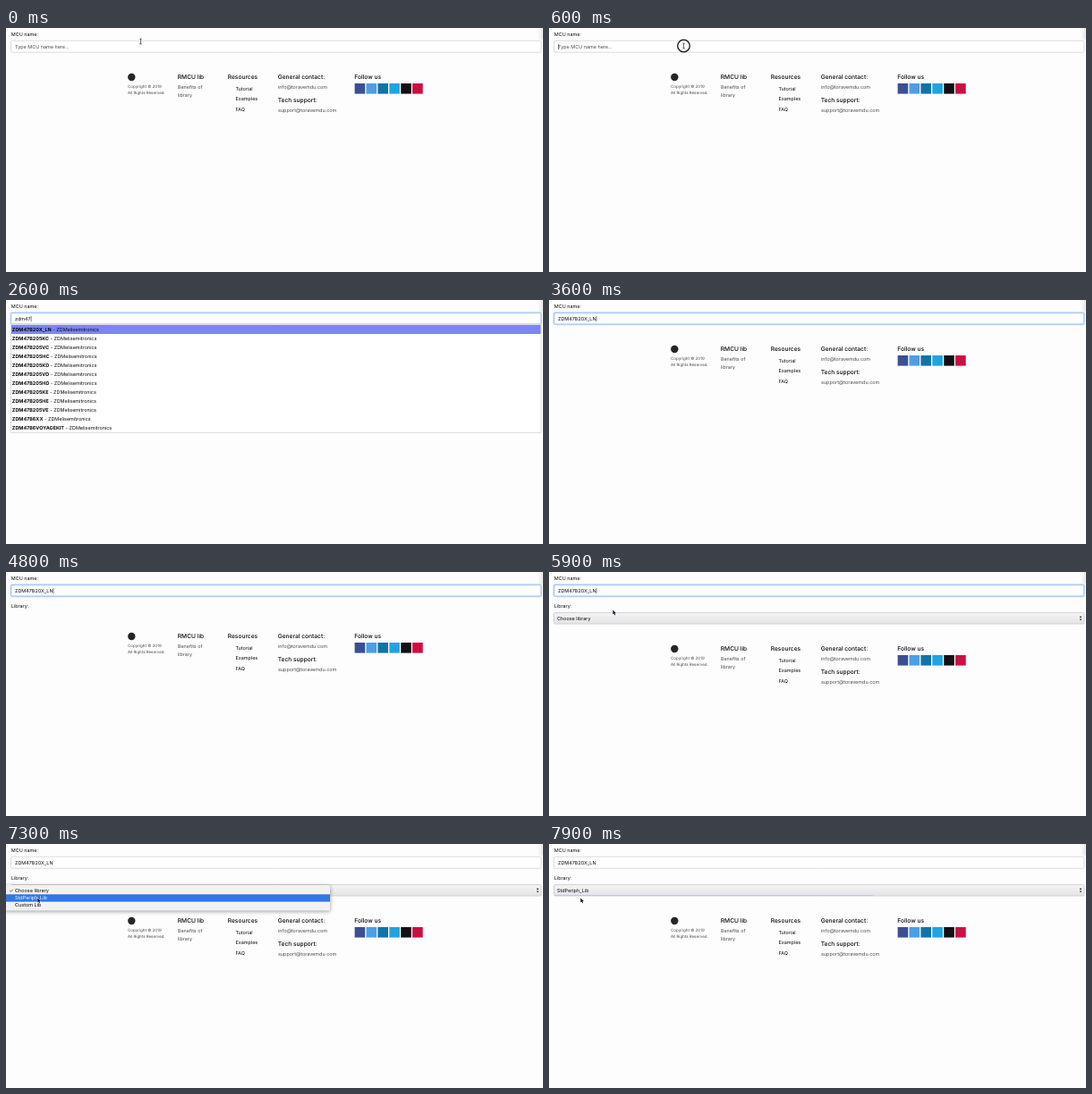
Recreate the animation shown at these times as an HTML page with a canvas. Size 600x273 px, loop 8000 ms.

```html
<!DOCTYPE html>
<html lang="en">
<head>
<meta charset="utf-8">
<title>Part picker</title>
<style>
html, body { margin: 0; width: 100%; height: 100%; overflow: hidden; background: #fefdfe; }
canvas { display: block; width: 600px; height: 273px; }
</style>
</head>
<body>
<canvas id="stage"></canvas>
<script>
const W = 600, H = 273, LOOP = 8000;
const canvas = document.getElementById('stage');
const ctx = canvas.getContext('2d');
const dpr = window.devicePixelRatio || 1;
canvas.width = W * dpr;
canvas.height = H * dpr;

const INK = '#08090b', GREY = '#46494d', BORDER = '#dadce0';
const MAKER = 'ZDMelisemitronics';
const PREFIX = 'zdm47';
const PART = 'ZDM47B20X_LN';
const PARTS = [PART,
  ...['KC', 'VC', 'HC', 'KD', 'VD', 'HD', 'KE', 'HE', 'VE'].map(s => 'ZDM47B205' + s),
  'ZDM47B6XX', 'ZDM47B6VOYAGEKIT'];
const OPTIONS = ['Choose library', 'StdPeriph_Lib', 'Custom Lib'];

// Times in ms
const FOCUS = 600, LIST_OPEN = 1500, ROW_ACTIVE = 2600, PICK = 3300;
const LABEL_IN = 4200, SELECT_IN = 5400, POPUP_OPEN = 6400, HOVER_NEXT = 7000;
const POPUP_CLOSE = 7500, POPUP_FADE = 250;
const KEYS = [1300, 1600, 1800, 2100, 2300];

const clamp = v => Math.max(0, Math.min(1, v));
const ramp = (t, from, to) => clamp((t - from) / (to - from));
const ease = p => p * p * (3 - 2 * p);
const mix = (a, b, p) => a + (b - a) * p;

function text(str, x, y, size = 5.45, color = INK, weight = 400) {
  ctx.font = `${weight} ${size}px Inter, "Open Sans", sans-serif`;
  ctx.fillStyle = color;
  ctx.fillText(str, x, y);
  return ctx.measureText(str).width;
}

function box(x, y, w, h, r, fill, stroke, line = 1) {
  ctx.beginPath();
  ctx.roundRect(x, y, w, h, r);
  if (fill) { ctx.fillStyle = fill; ctx.fill(); }
  if (stroke) { ctx.strokeStyle = stroke; ctx.lineWidth = line; ctx.stroke(); }
}

function footer(dy) {
  ctx.save();
  ctx.translate(0, dy);
  const head = (s, x, y) => text(s, x, y, 6.65, INK, 550);
  ctx.fillStyle = '#24262a';
  ctx.beginPath();
  ctx.arc(140.3, 55, 4.2, 0, 7);
  ctx.fill();
  text('Copyright © 2019', 136, 65.5, 4.5, GREY);
  text('All Rights Reserved.', 136, 72.3, 4.45, GREY);
  head('RMCU lib', 191.8, 55.2);
  text('Benefits of', 192, 66.5, 5.35, GREY);
  text('library', 192, 75, 5.35, GREY);
  head('Resources', 247.7, 55.2);
  ['Tutorial', 'Examples', 'FAQ'].forEach((s, i) => text(s, 256.5, 68.2 + i * 11.5));
  head('General contact:', 303.7, 55.2);
  text('info@toravemdu.com', 304, 66.6, 5.45, GREY);
  head('Tech support:', 303.7, 80.8);
  text('support@toravemdu.com', 304, 92.2, 5.45, GREY);
  head('Follow us', 389.3, 55.2);
  ['#3b4f92', '#4c9fe2', '#1273ab', '#22a3df', '#111111', '#cc0f40'].forEach((c, i) => {
    ctx.fillStyle = c;
    ctx.fillRect(389.6 + i * 12.9, 62, 11.6, 11.6);
  });
  ctx.restore();
}

function input(t) {
  const focus = ramp(t, FOCUS, FOCUS + 150) * (1 - ramp(t, POPUP_OPEN, 7200));
  box(5.5, 14.2, 592.5, 13, 1.6, '#fff', BORDER);
  if (focus > 0) {
    ctx.save();
    ctx.globalAlpha = focus;
    box(5.5, 14.2, 592.5, 13, 2, null, '#d9e7fb', 2.4);
    box(5.5, 14.2, 592.5, 13, 1.6, null, '#a3c6f6');
    ctx.restore();
  }
  const typed = PREFIX.slice(0, KEYS.filter(k => t >= k).length);
  const value = t >= PICK ? PART : typed;
  const width = value ? text(value, 10, 21.2) : 0;
  if (!value) text('Type MCU name here...', 10, 21.2, 5.45, GREY);

  const typing = t >= KEYS[0] && t < 3900;
  const blinkOn = Math.floor((t + 400) / 500) % 2 === 0;
  if (t >= FOCUS && t < POPUP_OPEN && (typing || blinkOn)) {
    ctx.fillStyle = '#333';
    ctx.fillRect(10.2 + width, 18, 0.6, 6.2);
  }
}

function suggestions(t) {
  if (t < LIST_OPEN || t >= PICK) return;
  box(5.5, 27.5, 592.5, 121, 0, '#fff', '#dcdce0');
  if (t >= ROW_ACTIVE) {
    ctx.fillStyle = '#7c85f6';
    ctx.fillRect(6, 28, 591.5, 10);
  }
  PARTS.forEach((name, i) => {
    const y = 33.2 + i * 10;
    const width = text(name, 6.8, y, 5.45, INK, 700);
    text(' - ' + MAKER, 6.8 + width, y);
  });
}

function triangle(x, y, h) {
  ctx.beginPath();
  ctx.moveTo(x - 1.2, y);
  ctx.lineTo(x + 1.2, y);
  ctx.lineTo(x, y + h);
  ctx.fill();
}

function select(t) {
  if (t < SELECT_IN) return;
  const shade = ctx.createLinearGradient(0, 45, 0, 58);
  shade.addColorStop(0, '#f5f5f6');
  shade.addColorStop(1, '#e4e4e7');
  box(5.5, 45.5, 592.5, 12.5, 1.5, shade, '#d2d2d6');
  text(OPTIONS[t >= POPUP_CLOSE ? 1 : 0], 9, 51.9);
  ctx.fillStyle = '#222';
  triangle(594, 51, -2);
  triangle(594, 52.4, 2);
}

function popup(t) {
  if (t < POPUP_OPEN) return;
  const alpha = 1 - ramp(t, POPUP_CLOSE, POPUP_CLOSE + POPUP_FADE);
  if (alpha === 0) {
    ctx.fillStyle = 'rgba(140,140,235,.3)';
    ctx.fillRect(6, 57, 356, 1);
    return;
  }
  ctx.save();
  ctx.globalAlpha = alpha;
  ctx.shadowColor = 'rgba(0,0,0,.4)';
  ctx.shadowBlur = 4 * dpr;
  ctx.shadowOffsetY = dpr;
  box(-2, 46, 364, 28.5, 2, '#f2f2f3');
  ctx.shadowColor = 'transparent';
  const active = t >= HOVER_NEXT ? 1 : 0;
  ctx.fillStyle = '#2f78e6';
  ctx.fillRect(0, 48.3 + active * 8, 362, 8.3);
  OPTIONS.forEach((s, i) => text(s, 10, 52.5 + i * 8, 5.5, i === active ? '#fff' : INK));
  text('✓', 3.5, 52.5, 5.5, active ? INK : '#fff');
  ctx.restore();
}

function ibeam(x, y) {
  ctx.strokeStyle = '#333';
  ctx.lineWidth = 0.7;
  ctx.beginPath();
  ctx.moveTo(x - 1.3, y - 2.8);
  ctx.lineTo(x + 1.3, y - 2.8);
  ctx.moveTo(x, y - 2.8);
  ctx.lineTo(x, y + 2.8);
  ctx.moveTo(x - 1.3, y + 2.8);
  ctx.lineTo(x + 1.3, y + 2.8);
  ctx.stroke();
}

function arrow(x, y) {
  ctx.beginPath();
  [[0, 0], [0, 5], [1.2, 4], [2, 5.8], [2.8, 5.4], [2, 3.7], [3.6, 3.6]]
    .forEach(([dx, dy]) => ctx.lineTo(x + dx, y + dy));
  ctx.closePath();
  ctx.lineWidth = 0.8;
  ctx.strokeStyle = '#fff';
  ctx.stroke();
  ctx.fillStyle = '#10131f';
  ctx.fill();
}

function ring(x, y) {
  ctx.strokeStyle = '#15171c';
  ctx.lineWidth = 1.3;
  ctx.beginPath();
  ctx.arc(x, y, 6.8, 0, 7);
  ctx.stroke();
}

function pointer(t) {
  if (t < KEYS[0]) {
    const y = mix(15, 20, ease(ramp(t, 100, 500)));
    ibeam(150.5, y);
    if (t >= FOCUS - 100 && t < FOCUS + 100) ring(150.5, y);
  } else if (t >= SELECT_IN) {
    const p = ease(ramp(t, SELECT_IN, 6200));
    const x = mix(150, 35.3, p);
    const y = mix(20, 53, p) + 7.5 * ease(ramp(t, 6800, 7200));
    if (y < 27) ibeam(x, y); else arrow(x, y);
    if ((t >= POPUP_OPEN - 50 && t < 6800) || (t >= 7350 && t < 7550)) ring(x + 0.7, y + 2.3);
  }
}

function corner() {
  const shade = ctx.createLinearGradient(594, 0, 600, 0);
  shade.addColorStop(0, 'rgba(120,120,130,0)');
  shade.addColorStop(1, 'rgba(120,120,130,.18)');
  ctx.fillStyle = shade;
  ctx.fillRect(594, 0, 6, 13);
}

function draw(t) {
  ctx.setTransform(dpr, 0, 0, dpr, 0, 0);
  ctx.textBaseline = 'middle';
  ctx.textRendering = 'geometricPrecision';
  ctx.fillStyle = '#fefdfe';
  ctx.fillRect(0, 0, W, H);
  corner();
  text('MCU name:', 5.8, 7.2);
  footer(t >= SELECT_IN ? 31 : t >= LABEL_IN ? 17 : 0);
  input(t);
  if (t >= LABEL_IN) text('Library:', 5.8, 37.9);
  select(t);
  suggestions(t);
  popup(t);
  pointer(t);
}

const start = performance.now();
function tick() {
  draw((performance.now() - start) % LOOP);
  requestAnimationFrame(tick);
}
tick();
</script>
</body>
</html>
```
